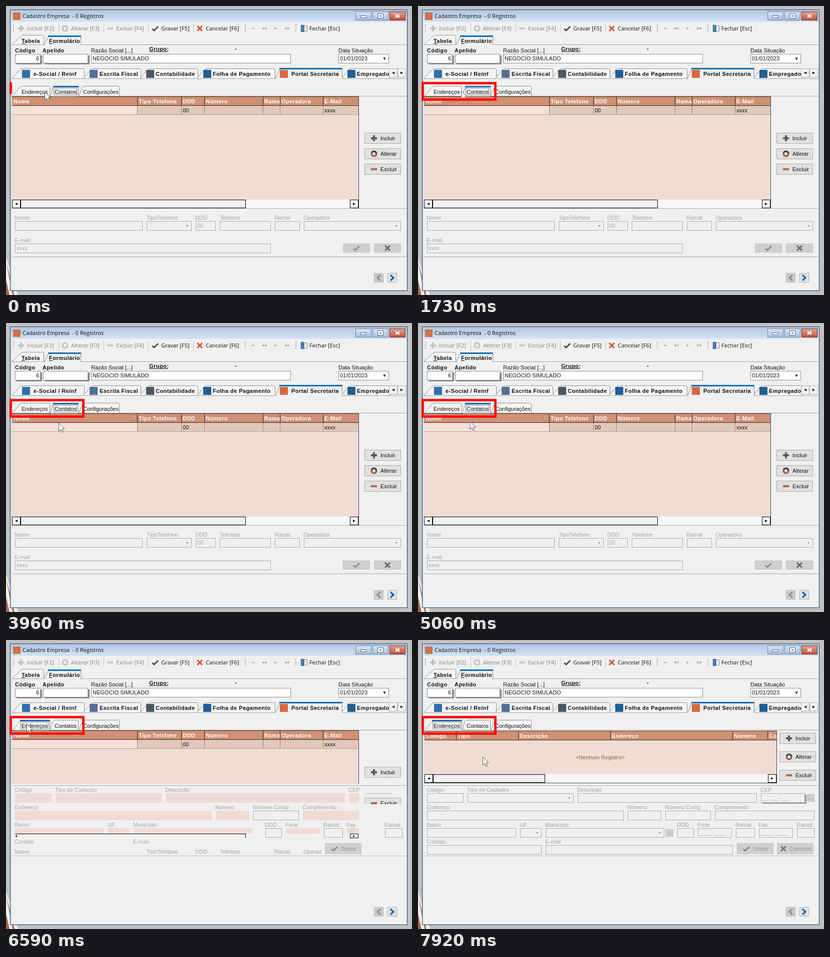
These frames come from a looping animation (811 px wide and 579 px high, 7990 ms). An HTML page with a canvas:

```html
<!DOCTYPE html>
<html lang="pt">
<head>
<meta charset="utf-8">
<style>
html, body { margin: 0; width: 811px; height: 579px; overflow: hidden; background: #c0c0c0; }
canvas { display: block; }
</style>
</head>
<body>
<canvas id="stage" width="811" height="579"></canvas>
<script>
const ctx = document.getElementById('stage').getContext('2d');
const LOOP = 7990;
const SMALL = '11px "Liberation Sans", sans-serif';
const BOLD = 'bold 11px "Liberation Sans", sans-serif';
const UI = '11px "Open Sans", sans-serif';
const BG = '#f0f0f0', INK = '#111', DIM = '#a2a2a2', EDGE = '#a9a9a9', FRAME = '#444';
const BLUE = '#0f6db8', HEAD = '#cf9074', BODY = '#efddd4', RED = '#fb140e';

function rect(x, y, w, h, color) {
  ctx.fillStyle = color;
  ctx.fillRect(x, y, w, h);
}

function box(x, y, w, h, fill, edge) {
  rect(x, y, w, h, edge);
  rect(x + 1, y + 1, w - 2, h - 2, fill);
}

// y is the middle of the capitals
function text(s, x, y, color = INK, font = SMALL, align = 'left') {
  ctx.font = font;
  ctx.letterSpacing = font === BOLD ? '0.45px' : '0px';
  ctx.textAlign = align;
  ctx.fillStyle = color;
  ctx.fillText(s, x, y + 4);
}

function trace(points) {
  ctx.beginPath();
  points.forEach(([x, y]) => ctx.lineTo(x, y));
}

function poly(points, color) {
  trace(points);
  ctx.closePath();
  ctx.fillStyle = color;
  ctx.fill();
}

function line(points, color, width = 1) {
  trace(points);
  ctx.strokeStyle = color;
  ctx.lineWidth = width;
  ctx.stroke();
}

function triangle(x, y, dx, dy, color) {
  poly([[x + dx, y + dy], [x - dx + dy, y - dy + dx], [x - dx - dy, y - dy - dx]], color);
}

const icons = {
  plus(x, y, c) {
    line([[x - 6, y], [x + 6, y]], c, 4);
    line([[x, y - 6], [x, y + 6]], c, 4);
  },
  minus(x, y, c) {
    line([[x - 6, y], [x + 6, y]], c, 4);
    line([[x - 5, y], [x + 5, y]], 'rgba(255,255,255,.25)', 1.5);
  },
  cycle(x, y, c, c2 = c) {
    [[c, Math.PI], [c2, 0]].forEach(([color, start]) => {
      ctx.beginPath();
      ctx.arc(x, y, 5, start + .2, start + 2.7);
      ctx.strokeStyle = color;
      ctx.lineWidth = 3.2;
      ctx.stroke();
    });
    triangle(x + 4.5, y, 0, 2.5, c);
    triangle(x - 4.5, y, 0, -2.5, c2);
  },
  check(x, y, c) {
    line([[x - 6, y + 1], [x - 2, y + 4], [x + 6, y - 4]], c, 3);
  },
  cross(x, y, c) {
    line([[x - 5, y - 5], [x + 5, y + 5]], c, 3);
    line([[x - 5, y + 5], [x + 5, y - 5]], c, 3);
  }
};

function button(x, y, label, icon, colors, off) {
  box(x, y, 73, 22, off ? '#d0d0d0' : '#e1e1e1', off ? '#c4c4c4' : '#aaa');
  const wide = label.length > 7;
  icons[icon](x + (wide ? 13 : 19), y + 11, ...colors);
  text(label, x + (wide ? 25 : 32), y + 11, off ? '#999' : INK);
}

function field(x, y, w, value = '', off = true) {
  box(x, y, w, 19, off ? BG : '#fff', off ? EDGE : '#8b8b8b');
  text(value, x + 3, y + 9, off ? DIM : INK);
}

function combo(x, y, w) {
  field(x, y, w);
  triangle(x + w - 9, y + 10, 0, 2, '#8e8e8e');
}

function arrowBox(x, y, dir) {
  box(x, y, 17, 17, '#fff', '#000');
  triangle(x + 8.5, y + 8.5, dir * 2.5, 0, '#000');
}

function scrollbar(x, y, right, thumb) {
  rect(x, y, right - x, 17, '#f7f7f7');
  arrowBox(x, y, -1);
  box(x + 17, y, thumb - x - 17, 17, BG, '#000');
  arrowBox(right - 17, y, 1);
}

function tab(x, right, top, bottom, slant, active) {
  const shape = [[x + .5, bottom], [x + slant, top + 2.5], [x + slant + 4, top + .5],
    [right - 2, top + .5], [right - .5, top + 2], [right - .5, bottom]];
  poly(shape, active ? BG : '#f5f5f5');
  line(shape, '#8f8f8f');
  if (active) {
    rect(x + slant, top - 1, right - x - slant, 3, BLUE);
    rect(x + 1, bottom - 1, right - x - 2, 2, BG);
  }
}

function drawBackdrop() {
  rect(0, 0, 811, 579, '#c1c1c1');
  poly([[0, 503], [24, 579], [0, 579]], '#f4f1ef');
  poly([[0, 512], [5, 530], [17, 579], [13, 579]], '#a87360');
  poly([[0, 548], [7, 579], [0, 579]], '#a8654c');

  box(8, 7, 794, 564, '#cbdcef', '#27466b');
  const sky = ctx.createLinearGradient(0, 8, 0, 32);
  sky.addColorStop(0, '#aec6e3');
  sky.addColorStop(1, '#d5e3f3');
  rect(9, 8, 792, 24, sky);
  rect(11, 32, 789, 537, BG);
  rect(14, 13, 15, 15, '#d0714c');
  text('Cadastro Empresa  - 0 Registros', 33, 20, INK, UI);

  [698, 732, 766].forEach((x, i) => {
    const g = ctx.createLinearGradient(0, 11, 0, 29);
    g.addColorStop(0, i < 2 ? '#dce8f5' : '#e8a795');
    g.addColorStop(1, i < 2 ? '#a3bcd8' : '#bd4a32');
    box(x, 11, 32, 18, g, i < 2 ? '#6484a8' : '#6d2c22');
  });
  box(708, 19, 12, 5, '#fff', '#53677e');
  box(742, 15, 12, 10, '#fff', '#53677e');
  rect(746, 19, 4, 2, '#53677e');
  line([[778, 17], [786, 23]], '#fff', 2.5);
  line([[778, 23], [786, 17]], '#fff', 2.5);
}

function drawToolbar() {
  const grip = x => { for (let y = 37; y < 53; y += 4) rect(x, y, 2, 2, '#a6a6a6'); };
  [14, 477, 578].forEach(grip);
  [105, 195, 284, 374].forEach(x => rect(x, 35, 1, 20, '#c5c5c5'));
  icons.plus(30, 45, '#c2c2c2');
  text('Incluir [F2]', 42, 45, '#808080', UI);
  icons.cycle(118, 45, '#c2c2c2');
  text('Alterar [F3]', 130, 45, '#808080', UI);
  icons.minus(208, 45, '#c2c2c2');
  text('Excluir [F4]', 220, 45, '#808080', UI);
  icons.check(298, 45, '#46505a');
  text('Gravar [F5]', 310, 45, INK, UI);
  icons.cross(387, 45, '#d25633');
  text('Cancelar [F6]', 399, 45, INK, UI);
  [[493, -1], [513, -1], [518, -1], [539, 1], [560, 1], [565, 1]]
    .forEach(([x, dir]) => triangle(x, 45, dir * 2.5, 0, '#a3adb8'));
  box(589, 38, 6, 14, '#4b84b8', '#2d567e');
  box(595, 39, 7, 12, '#e5eef6', '#7890a8');
  text('Fechar [Esc]', 606, 45, INK, UI);
}

function drawCompany() {
  rect(11, 77, 789, 1, '#a0a0a0');
  tab(12, 76, 58, 77, 18);
  tab(76, 150, 60, 78, 8, true);
  text('Tabela', 31, 70, INK, BOLD);
  rect(31, 75, 7, 1, INK);
  text('Formulário', 86, 70, INK, BOLD);
  rect(86, 75, 7, 1, INK);

  text('Código', 18, 89, INK, BOLD);
  text('Apelido', 73, 89, INK, BOLD);
  [[18, 51], [74, 90]].forEach(([x, w]) => {
    rect(x + 3, 99, w, 18, '#8d8d8d');
    field(x, 96, w, '', false);
  });
  text('6', 66, 105, INK, SMALL, 'right');
  text('Razão Social [...]', 170, 89);
  field(170, 96, 399, 'NEGOCIO SIMULADO', false);
  text('Grupo:', 286, 86, INK, BOLD);
  rect(286, 91, 38, 1, INK);
  triangle(459, 87, 0, 1.5, INK);
  text('Data Situação', 664, 89);
  field(664, 96, 101, '01/01/2023', false);
  triangle(756, 106, 0, 2.5, INK);
}

function drawModules() {
  rect(11, 145, 789, 1, '#a0a0a0');
  const modules = [
    [12, 157, 32, '#2d6fae', 'e-Social / Reinf', 55],
    [154, 270, 167, '#536f98', 'Escrita Fiscal', 187],
    [267, 384, 280, '#4b5864', 'Contabilidade', 299],
    [381, 538, 394, '#1e5f96', 'Folha de Pagamento', 413],
    [669, 767, 682, '#1e5f96', 'Empregado', 701],
    [538, 672, 547, '#d8693f', 'Portal Secretaria', 570]
  ];
  modules.forEach(([x, right, iconX, color, label, textX], i) => {
    const active = i === 5;
    tab(x, right, 125, active ? 146 : 145, active ? 8 : 16, active);
    rect(iconX, 128, 16, 16, color);
    text(label, textX, 136, INK, BOLD);
  });
  [[765, -1], [782, 1]].forEach(([x, dir]) => {
    box(x, 125, 17, 18, '#f3f3f3', '#b0b0b0');
    triangle(x + 8.5, 134, dir * 2.5, 0, '#000');
  });
}

function drawSubtabs(onAddress) {
  rect(11, 180, 789, 1, '#a0a0a0');
  tab(13, 88, onAddress ? 161 : 160, 180, 15, onAddress);
  tab(88, 145, onAddress ? 160 : 161, 180, 6, !onAddress);
  tab(145, 227, 160, 180, 8);
  text('Endereços', 31, 172);
  text('Contatos', 97, 172);
  text('Configurações', 154, 172);
  ctx.setLineDash([1, 1]);
  ctx.strokeStyle = '#333';
  ctx.lineWidth = 1;
  if (onAddress) ctx.strokeRect(29.5, 164.5, 55, 14);
  else ctx.strokeRect(95.5, 164.5, 46, 14);
  ctx.setLineDash([]);
}

function gridHead(x, y, right, columns) {
  rect(x, y, right - x, 18, HEAD);
  rect(x, y, right - x, 1, '#55392f');
  rect(x, y + 18, right - x, 1, '#3b2a24');
  columns.forEach(([label, left], i) => {
    const end = i + 1 < columns.length ? columns[i + 1][1] - 3 : right;
    if (i) rect(left - 3, y, 1, 18, '#3b2a24');
    ctx.save();
    ctx.beginPath();
    ctx.rect(left, y, end - left, 18);
    ctx.clip();
    text(label, left, y + 10, '#fff', BOLD);
    ctx.restore();
  });
}

function drawContacts(filterHint) {
  const columns = [['Nome', 15], ['Tipo Telefone', 265], ['DDD', 353], ['Número', 399],
    ['Ramal', 516], ['Operadora', 550], ['E-Mail', 636]];
  rect(11, 181, 694, 207, BODY);
  gridHead(12, 181, 704, columns);
  rect(12, 200, 250, 17, '#f5e1d9');
  rect(262, 200, 442, 17, '#e2c8bb');
  columns.slice(1).forEach(([, x]) => rect(x - 3, 200, 1, 17, '#9c8175'));
  rect(12, 217, 692, 1, '#b59b8f');
  text('00', 353, 209);
  text('xxxx', 636, 209);
  rect(704, 181, 1, 224, FRAME);
  if (filterHint) {
    box(250, 184, 11, 11, '#d9a78f', '#a96e53');
    triangle(255.5, 190, 0, 2, '#a96e53');
  }
  scrollbar(12, 388, 704, 479);
  drawButtons(716, 254, 31);

  rect(11, 405, 789, 1, '#aaa');
  drawContactLabels();
  field(18, 431, 255);
  combo(281, 431, 90);
  field(379, 431, 40, '00');
  field(427, 431, 102);
  field(537, 431, 50);
  combo(595, 431, 194);
  text('E-mail', 17, 469, DIM);
  field(18, 476, 511, 'xxxx');
  box(673, 476, 54, 18, '#cfcfcf', '#c2c2c2');
  icons.check(700, 485, '#8d8d8d');
  box(735, 476, 54, 18, '#cfcfcf', '#c2c2c2');
  icons.cross(762, 485, '#666');
  rect(11, 502, 789, 1, '#aaa');
}

function drawContactLabels() {
  [['Nome', 17], ['TipoTelefone', 281], ['DDD', 378], ['Telefone', 427], ['Ramal', 536], ['Operadora', 594]]
    .forEach(([s, x]) => text(s, x, 424, DIM));
}

function drawButtons(x, y, step) {
  button(x, y, 'Incluir', 'plus', ['#4c6049']);
  button(x, y + step, 'Alterar', 'cycle', ['#3e3e3e', '#b9502f']);
  button(x, y + 2 * step, 'Excluir', 'minus', ['#bd4c2a']);
}

const addressRows = [
  { y: 307, cells: [['Código', 18, 73], ['Tipo de Cadastro', 99, 212, 'combo'], ['Descrição', 319, 358], ['CEP', 685, 88, '__.___-___']] },
  { y: 342, cells: [['Endereço', 18, 393], ['Número', 419, 67], ['Número Comp', 494, 91], ['Complemento', 593, 199]] },
  { y: 377, cells: [['Bairro', 18, 178], ['UF', 204, 43, 'combo'], ['Município', 255, 237, 'combo'], ['DDD', 518, 33],
    ['Fone', 559, 68, '____-____'], ['Ramal', 635, 38], ['Fax', 681, 68, '____-____'], ['Ramal', 757, 35]] },
  { y: 411, cells: [['Contato', 18, 229], ['E-mail', 255, 374]] }
];

function drawAddressForm(partial) {
  rect(11, 291, 789, 1, '#aaa');
  rect(11, 432, 789, 1, '#bbb');
  const plain = ['Número Comp', 'DDD', 'Ramal'];
  addressRows.forEach(({ y, cells }) => cells.forEach(([label, x, w, kind]) => {
    text(label, x - 1, y - 7, DIM);
    if (partial && !plain.includes(label)) {
      if (y < 411) rect(x, y, Math.min(w, 705 - x), y === 377 ? 11 : 19, '#eedbd4');
      return;
    }
    if (label === 'CEP') rect(x + 3, y + 3, w, 18, '#9a9a9a');
    if (kind === 'combo') combo(x, y, w);
    else field(x, y, w, kind);
  }));
  button(637, 407, 'Salvar', 'check', ['#888'], true);
  if (partial) return;
  [[777, 309], [495, 379]].forEach(([x, y]) => {
    box(x, y, 15, 15, '#d0d0d0', '#bdbdbd');
    text('...', x + 3, y + 6, '#888');
  });
  button(717, 407, 'Cancelar', 'cross', ['#777'], true);
}

function drawAddresses() {
  rect(12, 182, 705, 88, BODY);
  gridHead(13, 182, 716, [['Código', 16], ['Tipo', 79], ['Descrição', 203], ['Endereço', 387], ['Número', 631], ['Complemento', 701]]);
  text('<Nenhum Registro>', 364, 235, '#9b604b', SMALL, 'center');
  scrollbar(13, 269, 716, 254);
  rect(716, 182, 1, 105, FRAME);
  rect(12, 286, 705, 1, FRAME);
  drawButtons(722, 186, 37);
  drawAddressForm(false);
}

// Half-repainted window while the page is being switched
function drawSwitching() {
  drawContacts(false);
  rect(11, 288, 789, 215, BG);
  rect(706, 277, 94, 26, BG);
  drawAddressForm(true);
  rect(716, 307, 57, 1, '#bbb');
  ctx.save();
  ctx.beginPath();
  ctx.rect(716, 316, 73, 13);
  ctx.clip();
  button(716, 316, 'Excluir', 'minus', ['#bd4c2a']);
  ctx.restore();
  rect(18, 388, 461, 1, '#000');
  rect(478, 388, 1, 8, '#000');
  triangle(20, 393, -2, 0, '#000');
  box(687, 388, 17, 9, '#fff', '#000');
  triangle(695, 393, 2, 0, '#000');
  ctx.save();
  ctx.beginPath();
  ctx.rect(11, 416, 619, 15);
  ctx.clip();
  drawContactLabels();
  ctx.restore();
}

function drawPager() {
  box(735, 535, 19, 19, '#cacaca', '#bcbcbc');
  line([[748, 539], [742, 544.5], [748, 550]], '#8a8a8a', 3);
  box(762, 535, 19, 19, '#e3e3e3', '#b0b0b0');
  line([[768, 539], [774, 544.5], [768, 550]], BLUE, 3.5);
}

const pointerPath = [
  [0, 77, 172], [70, 77, 172], [560, 43, 169], [1220, 43, 169], [1320, 86, 170],
  [1900, 86, 170], [2080, 96, 172], [2150, 96, 172], [2220, 106, 172], [2680, 106, 172],
  [3230, 93, 181], [3500, 93, 181], [3630, 105, 200], [4920, 105, 200], [5620, 88, 167],
  [6450, 87, 167], [6520, 41, 168], [6720, 41, 168], [7220, 68, 218], [7340, 68, 218], [7920, 129, 234]
];

function pointerAt(t) {
  const next = pointerPath.findIndex(p => p[0] > t);
  if (next < 0) return pointerPath.at(-1).slice(1);
  const [t0, x0, y0] = pointerPath[next - 1];
  const [t1, x1, y1] = pointerPath[next];
  const k = (t - t0) / (t1 - t0), e = k * k * (3 - 2 * k);
  return [x0 + (x1 - x0) * e, y0 + (y1 - y0) * e];
}

function drawPointer(t) {
  const [x, y] = pointerAt(t);
  const shape = [[0, 0], [0, 16], [4, 12.5], [6.5, 18.5], [9, 17.5], [6.5, 11.5], [11.5, 11.5], [0, 0]]
    .map(([dx, dy]) => [x + dx + .5, y + dy + .5]);
  poly(shape, '#fff');
  line(shape, '#555');
}

function drawHighlight(t) {
  const left = 9.5, top = 154.5, right = 154.5, bottom = 187.5;
  const total = 2 * (right - left + bottom - top);
  const drawn = Math.min(total, 20 + t * .345);
  ctx.save();
  ctx.lineCap = drawn < total ? 'round' : 'square';
  ctx.setLineDash(drawn < total ? [drawn, total] : []);
  line([[left, top], [left, bottom], [right, bottom], [right, top], [left, top]], RED, 5);
  ctx.restore();
}

function draw(t) {
  drawBackdrop();
  drawToolbar();
  drawCompany();
  drawModules();
  drawSubtabs(t >= 6580);
  if (t < 6580) drawContacts(t >= 3560 && t < 5300);
  else if (t < 6655) drawSwitching();
  else drawAddresses();
  drawPager();
  drawPointer(t);
  drawHighlight(t);
}

const start = performance.now();
function tick() {
  draw((performance.now() - start) % LOOP);
  requestAnimationFrame(tick);
}
tick();
</script>
</body>
</html>
```
